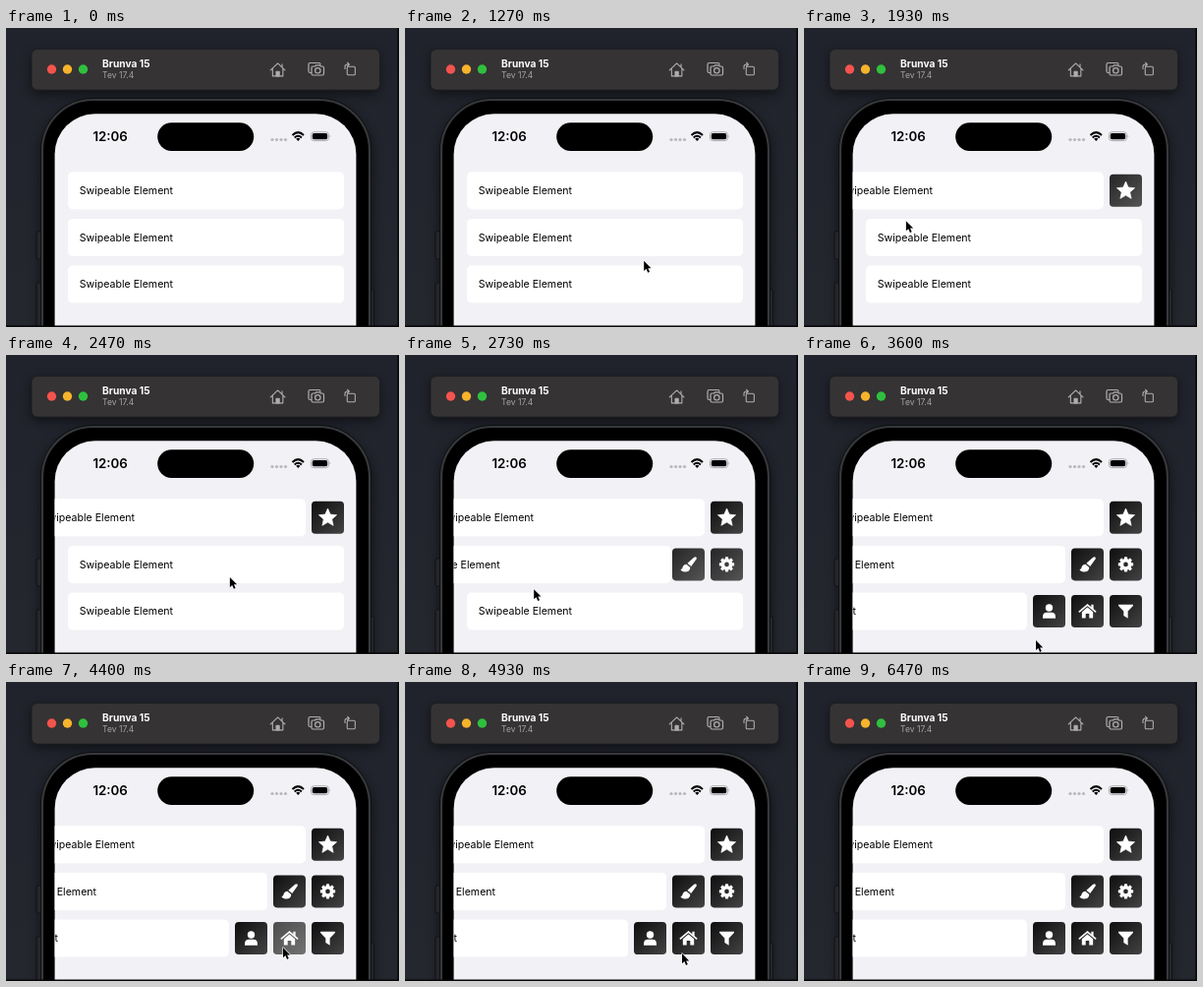
An HTML page for the animation above (6.54 s loop, 400 px wide and 304 px high).

```html
<!DOCTYPE html>
<html lang="en">
<head>
<meta charset="utf-8">
<title>Swipeable rows</title>
<style>
  html, body { margin: 0; width: 100%; height: 100%; overflow: hidden; background: #22252e; }
  svg { display: block; width: 400px; height: 304px; font-family: Inter, Roboto, sans-serif; }
</style>
</head>
<body>
<svg viewBox="0 0 400 304">
  <defs>
    <linearGradient id="desk" x2="0" y2="1">
      <stop stop-color="#20232c"/><stop offset="1" stop-color="#25272f"/>
    </linearGradient>
    <linearGradient id="tile" x2="1" y2="1">
      <stop stop-color="#0e0e0e"/><stop offset="1" stop-color="#434343"/>
    </linearGradient>
    <filter id="soft" x="-10%" y="-30%" width="120%" height="160%"><feGaussianBlur stdDeviation="6"/></filter>
    <clipPath id="screen"><rect x="49.600" y="87.300" width="306.800" height="300" rx="41"/></clipPath>
  </defs>

  <rect width="400" height="304" fill="url(#desk)"/>

  <!-- Window bar -->
  <rect x="26" y="25" width="354" height="42" rx="6" opacity=".5" filter="url(#soft)"/>
  <rect x="34" y="76" width="339" height="330" rx="54" opacity=".5" filter="url(#soft)"/>
  <rect x="26" y="21.500" width="354.500" height="41.500" rx="6" fill="#353334" stroke="#1c1d20" stroke-width=".8"/>
  <circle cx="46.500" cy="42" r="4.700" fill="#f4544d"/>
  <circle cx="62.500" cy="42" r="4.700" fill="#f6b32c"/>
  <circle cx="78.500" cy="42" r="4.700" fill="#30c03f"/>
  <text x="98" y="39.800" font-size="10.200" font-weight="700" fill="#fff">Brunva 15</text>
  <text x="98" y="51" font-size="8.600" fill="#a5a3a5">Tev 17.4</text>
  <g fill="none" stroke="#b0aeb0" stroke-width="1.200" stroke-linejoin="round" stroke-linecap="round">
    <g transform="translate(276.600 42.400) scale(.92) translate(-277 -42)">
      <path d="M269 42.500L277 35L285 42.500M271.300 41V49H282.700V41M281.800 39V36"/>
      <path d="M275.300 49V44H278.700V49Z" fill="#b0aeb0"/>
    </g>
    <path d="M310.500 45.500H309.500Q308 45.500 308 44V37Q308 35.500 309.500 35.500H318.500Q320 35.500 320 37"/>
    <path d="M312.500 39H314.500L315.500 37.800H319.500L320.500 39H322Q323.500 39 323.500 40.500V46.500Q323.500 48 322 48H312.500Q311 48 311 46.500V40.500Q311 39 312.500 39Z"/>
    <circle cx="317.300" cy="43.300" r="2.700"/>
    <g transform="translate(345 41.500) scale(.9) translate(-345 -41.500)">
      <rect x="347.500" y="39" width="9" height="9.500" rx="1.300"/>
      <path d="M345 41.500V39Q345 36.500 348 36.500H349.500M347.800 34.500L349.800 36.500L347.800 38.500"/>
    </g>
  </g>

  <!-- Phone -->
  <g fill="#25262a" stroke="#0d0e10" stroke-width=".8">
    <rect x="31" y="207" width="6" height="28" rx="1.500"/>
    <rect x="31" y="259" width="6" height="60" rx="1.500"/>
    <rect x="369" y="266" width="5.500" height="60" rx="1.500"/>
  </g>
  <rect x="35" y="71" width="337" height="331" rx="53.500" fill="#0d0e10"/>
  <rect x="37" y="73" width="333" height="330" rx="51.500" stroke="#37383b" stroke-width="2.200"/>
  <rect x="49.600" y="87.300" width="306.800" height="300" rx="41" fill="#f2f1f5"/>
  <rect x="154.200" y="96.200" width="98" height="28.800" rx="14.400"/>
  <text x="88.400" y="115" font-size="13.300" font-weight="600">12:06</text>
  <g fill="#b8b8bb">
    <circle cx="271" cy="113.500" r="1.600"/><circle cx="275.500" cy="113.500" r="1.600"/>
    <circle cx="280" cy="113.500" r="1.600"/><circle cx="284.500" cy="113.500" r="1.600"/>
  </g>
  <g fill="none" stroke="#000" stroke-width="2">
    <path d="M291.500 109Q297.300 103.300 303 109M293.700 111.400Q297.300 108 300.900 111.400"/>
    <path d="M295.200 112.700Q297.300 111 299.400 112.700L297.300 115Z" fill="#000" stroke="none"/>
  </g>
  <rect x="310.500" y="105.800" width="18" height="8.800" rx="2.800" fill="none" stroke="#a2a2a5" stroke-width=".9"/>
  <rect x="311.800" y="107.100" width="15.400" height="6.200" rx="1.700"/>
  <path d="M329.700 108.600Q331.200 110.200 329.700 111.800Z" fill="#a2a2a5"/>

  <g id="rows" clip-path="url(#screen)"></g>
  <g id="cursor">
    <path transform="scale(.88)" d="M0 0V11.600L2.700 9.100L4.600 13.500L6.600 12.600L4.700 8.400H8.300Z" stroke="#fff" stroke-width="1.300" paint-order="stroke" stroke-linejoin="round"/>
  </g>
  <path d="M398.500 0H400V304H0V302.500H398.500Z" fill="#050506"/>
</svg>

<script>
const LOOP = 6540, STEP = 200 / 3;
const TILE = 33, TILE_PITCH = 39;

const starPoints = Array.from({ length: 10 }, (_, i) => {
  const r = i % 2 ? 4.9 : 10.6, a = (i / 5 - 0.5) * Math.PI;
  return `${(r * Math.cos(a)).toFixed(2)},${(r * Math.sin(a) + 0.5).toFixed(2)}`;
}).join(' ');
const tooth = i => `<rect x="-1.800" y="-8.500" width="3.600" height="4" rx=".8" transform="rotate(${i * 45})"/>`;

// Icons are drawn around the centre of their tile.
const icons = {
  star: `<polygon points="${starPoints}" stroke="#fff" stroke-width=".8" stroke-linejoin="round"/>`,
  gear: `<circle r="4.600" fill="none" stroke="#fff" stroke-width="4"/>` + [0, 1, 2, 3, 4, 5, 6, 7].map(tooth).join(''),
  brush: `<path d="M7.500 -8.500Q9.800 -8.500 9 -6L3 2.300L-1.200 -1.300L6 -7.700Z"/>
    <path d="M-2.200 -.3L2 3.400Q1.800 8.500 -4 8.500Q-8 8.500 -9 5.500Q-6.800 5.800 -6.500 3Q-5.500 -.3 -2.200 -.3Z"/>`,
  person: `<circle cy="-4" r="4.100"/><path d="M-7.200 8V6Q-7.200 1.300 -2.500 1.300H2.500Q7.200 1.300 7.200 6V8Z"/>`,
  house: `<path d="M-9 .3L0 -7.300L9 .3" fill="none" stroke="#fff" stroke-width="1.900" stroke-linecap="round"/>
    <path d="M4.300 -7.500H6.800V-1L4.300 -3.500ZM-6.300 .7L0 -4.600L6.300 .7V7.800H2V2.800H-2V7.800H-6.300Z"/>`,
  funnel: `<path d="M-8 -7.500H8Q8.800 -6.700 8 -5.900L2.400 -.1V8L-2.400 5V-.1L-8 -5.900Q-8.800 -6.700 -8 -7.500Z"/>`
};

// Rows: buttons from left to right, swipe distance and button fade as [time, value].
const rows = [
  { buttons: ['star'], shift: [[1670, 0], [1870, 39]], fade: [[1670, 0], [2000, 1]] },
  { buttons: ['brush', 'gear'], shift: [[2470, 0], [2730, 73], [2870, 78]], fade: [[2470, 0], [2800, 1]] },
  { buttons: ['person', 'house', 'funnel'], shift: [[3200, 0], [3400, 117]], fade: [[3180, 0], [3500, 1]] }
];

// Pointer path as [time, x, y].
const pointer = [
  [1000, 262, 312], [1270, 243, 236], [1470, 235, 200], [1670, 231, 186],
  [1930, 105, 196], [2010, 85, 200], [2330, 224, 222], [2500, 228, 227],
  [2730, 133, 238], [2870, 37, 243], [3000, 110, 260], [3200, 234, 276],
  [3420, 28, 283], [3600, 236, 290], [3730, 268, 287], [4100, 280, 279],
  [4400, 282, 270], [4530, 282, 276], [6250, 282, 276], [6460, 284, 312]
];
const press = [[4290, 1], [4400, 0.72], [4530, 1]];

// Monotone cubic interpolation of column c through the keys.
function sample(keys, t, c = 1) {
  const last = keys.length - 1;
  if (t <= keys[0][0]) return keys[0][c];
  if (t >= keys[last][0]) return keys[last][c];
  const i = keys.findIndex(k => k[0] > t) - 1;
  const slope = j => (keys[j + 1][c] - keys[j][c]) / (keys[j + 1][0] - keys[j][0]);
  const tangent = j => {
    if (j === 0 || j === last) return 0;
    const a = slope(j - 1), b = slope(j);
    return a * b > 0 ? 2 * a * b / (a + b) : 0;
  };
  const span = keys[i + 1][0] - keys[i][0], u = (t - keys[i][0]) / span, v = 1 - u;
  return keys[i][c] * (1 + 2 * u) * v * v + keys[i + 1][c] * u * u * (3 - 2 * u)
    + span * u * v * (tangent(i) * v - tangent(i + 1) * u);
}

const byId = id => document.getElementById(id);
const button = (name, x) => `<g id="${name}" transform="translate(${x} 19)">
  <rect x="${-TILE / 2}" y="${-TILE / 2}" width="${TILE}" height="${TILE}" rx="3.800" fill="url(#tile)"/>
  <g fill="#fff" transform="scale(.9)">${icons[name]}</g></g>`;

byId('rows').innerHTML = rows.map(({ buttons }, i) => {
  const tiles = buttons.map((name, k) => button(name, 327.5 - (buttons.length - 1 - k) * TILE_PITCH));
  return `<g transform="translate(0 ${146.2 + i * 47.7})">
    <g id="tiles${i}">${tiles.join('')}</g>
    <g id="card${i}"><rect x="63" width="281" height="38" rx="5" fill="#fff"/>
    <text x="74.800" y="22.900" font-size="10.600">Swipeable Element</text></g></g>`;
}).join('');

function draw(t) {
  rows.forEach((row, i) => {
    byId('card' + i).setAttribute('transform', `translate(${-sample(row.shift, t)} 0)`);
    byId('tiles' + i).setAttribute('opacity', sample(row.fade, t));
  });
  byId('house').setAttribute('opacity', sample(press, t));
  byId('cursor').setAttribute('transform', `translate(${sample(pointer, t, 1)} ${sample(pointer, t, 2)})`);
}

const start = performance.now();
function tick() {
  const t = (performance.now() - start) % LOOP;
  draw(Math.min(97, Math.floor((t + 4) / STEP)) * STEP);
  requestAnimationFrame(tick);
}
tick();
</script>
</body>
</html>
```
